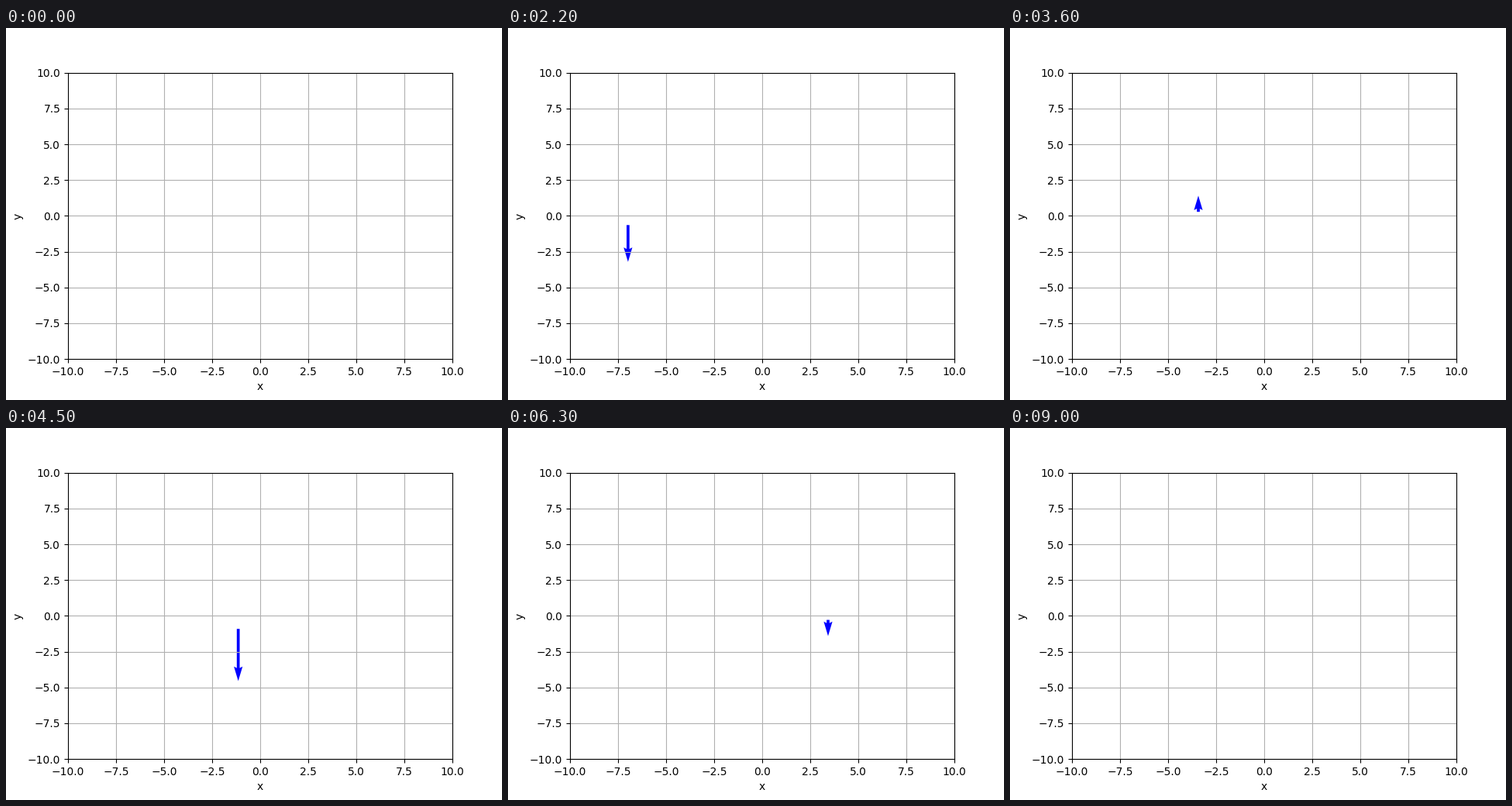
A matplotlib script that plays this animation: 640 px wide and 480 px high, repeating every 10000 ms.

```python
import numpy as np
import matplotlib.pyplot as plt
from matplotlib.animation import FuncAnimation

FRAMES = 100
xs = np.linspace(-4 * np.pi, 4 * np.pi, FRAMES)

fig, ax = plt.subplots(figsize=(6.4, 4.8), dpi=100)
ax.set_xlabel("x")
ax.set_ylabel("y")
ax.grid(True)

# Arrow length: a unit vector spans a fifth of the axes height.
arrow = ax.quiver([xs[0]], [0], [0], [1], color="blue",
                  scale=5, scale_units="height")
ax.set_xlim(-10, 10)
ax.set_ylim(-10, 10)


def update(i):
    """Slide the arrow along y = sin(x), its length following the height."""
    x, y = xs[i], np.sin(xs[i])
    arrow.set_offsets([[x, y]])
    arrow.set_UVC([0], [y])
    return (arrow,)


anim = FuncAnimation(fig, update, frames=FRAMES, interval=100,
                     init_func=lambda: update(0), repeat=True)
plt.show()
```
